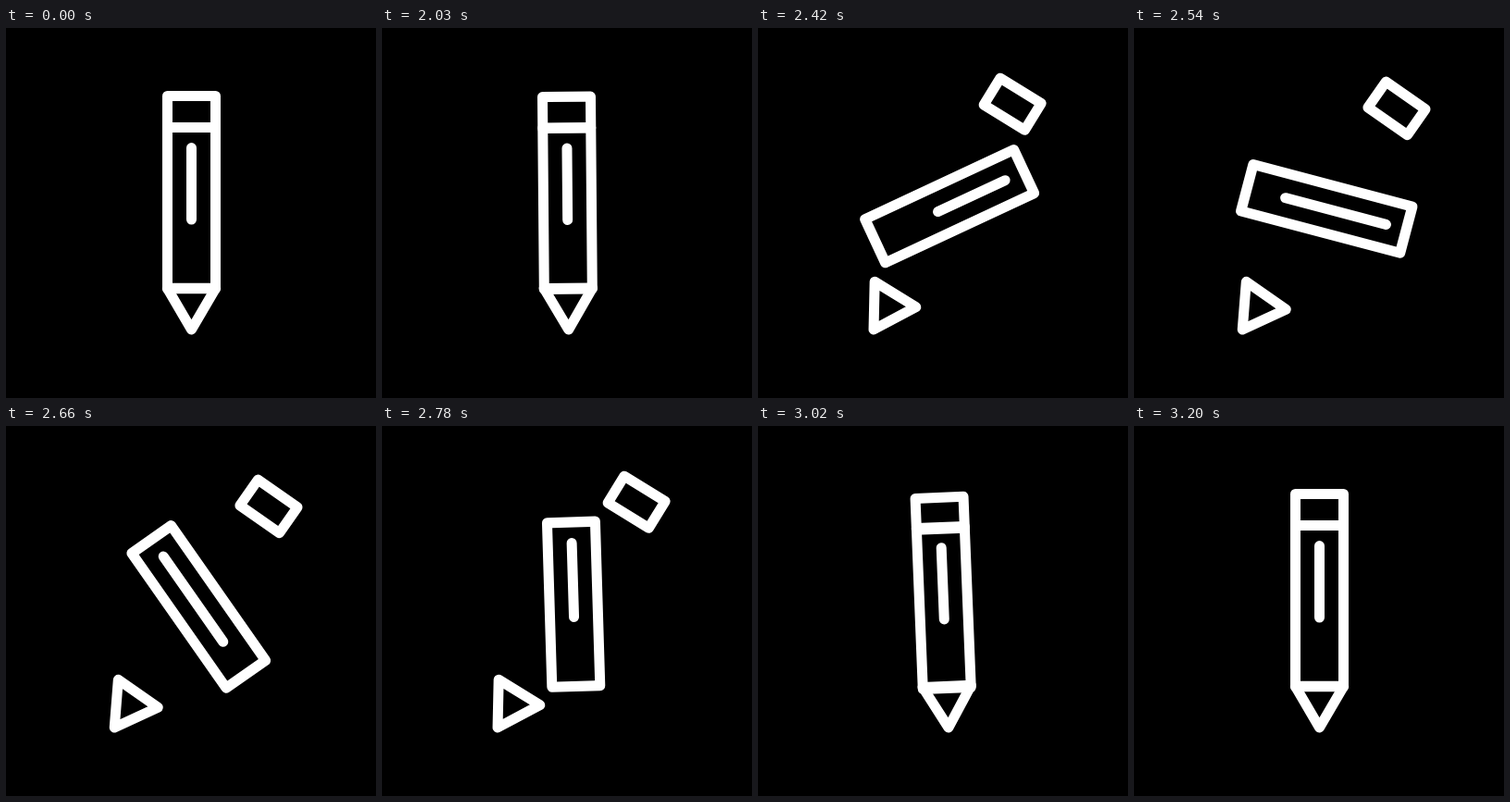
Animation of 400x400 px, one loop 3350 ms. Source, as an HTML page:

```html
<!DOCTYPE html>
<html lang="en">
<head>
<meta charset="utf-8">
<title>Pencil</title>
<style>
  html, body { margin: 0; width: 100%; height: 100%; overflow: hidden; background: #000; }
  svg { display: block; width: 100%; height: 100%; }
</style>
</head>
<body>
<svg viewBox="0 0 400 400" fill="none" stroke="#fff" stroke-width="11" stroke-linecap="round" stroke-linejoin="round">
  <!-- the pencil stands on its point at 0,0 -->
  <g id="pencil">
    <path id="tip" d="M0 0L-26.2 -44.7H26.2Z"/>
    <g id="body">
      <rect x="-26" y="-87.2" width="52" height="174.4"/>
      <line id="mark"/>
    </g>
    <rect id="cap" x="-26" y="-252.5" width="52" height="34"/>
  </g>
</svg>
<script>
const LOOP = 3350, START = 2000, MID = 2600, STEP = 30;
const $ = id => document.getElementById(id);
const pencil = $('pencil'), body = $('body'), mark = $('mark'), cap = $('cap');

const clamp = v => Math.min(1, Math.max(0, v));
const mix = (a, b, k) => a + (b - a) * k;

function smooth(t, from, to) {
  const v = clamp((t - from) / (to - from));
  return v * v * (3 - 2 * v);
}

// cubic bezier easing with control points (x1, 0) and (x2, 1)
function ease(x, x1, x2) {
  let lo = 0, hi = 1;
  for (let i = 0; i < 30; i++) {
    const s = (lo + hi) / 2, w = 1 - s;
    if (3 * w * w * s * x1 + 3 * w * s * s * x2 + s * s * s < x) lo = s;
    else hi = s;
  }
  return lo * lo * (3 - 2 * lo);
}

// lean: a small wind-up, a quick swing out, then the same way back
function lean(t) {
  const u = MID - START - Math.abs(t - MID), windUp = 133, back = -0.11;
  if (u <= 0) return 0;
  if (u < windUp) return back * smooth(u, 0, windUp);
  return mix(back, 1, ease((u - windUp) / (MID - START - windUp), 0.333, 0.13));
}

function draw(time) {
  const t = START + Math.floor((time - START) / STEP) * STEP;
  const p = lean(t);
  const spin = 180 * smooth(t, 2200, 3000);
  pencil.setAttribute('transform', `translate(${200.5 - 84 * p} 326) rotate(${35.2 * p})`);
  cap.setAttribute('transform', `translate(0 ${-56.5 * p})`);
  body.setAttribute('transform',
    `translate(0 ${-131.4 - 28 * p}) rotate(${spin}) scale(1 ${1 + 0.02 * p})`);
  mark.setAttribute('y1', mix(-65, -12.5, smooth(t, 2560, 2800)));
  mark.setAttribute('y2', mix(12.5, 65, smooth(t, 2400, 2640)));
}

const origin = performance.now();
function tick() {
  draw((performance.now() - origin) % LOOP);
  requestAnimationFrame(tick);
}
tick();
</script>
</body>
</html>
```
